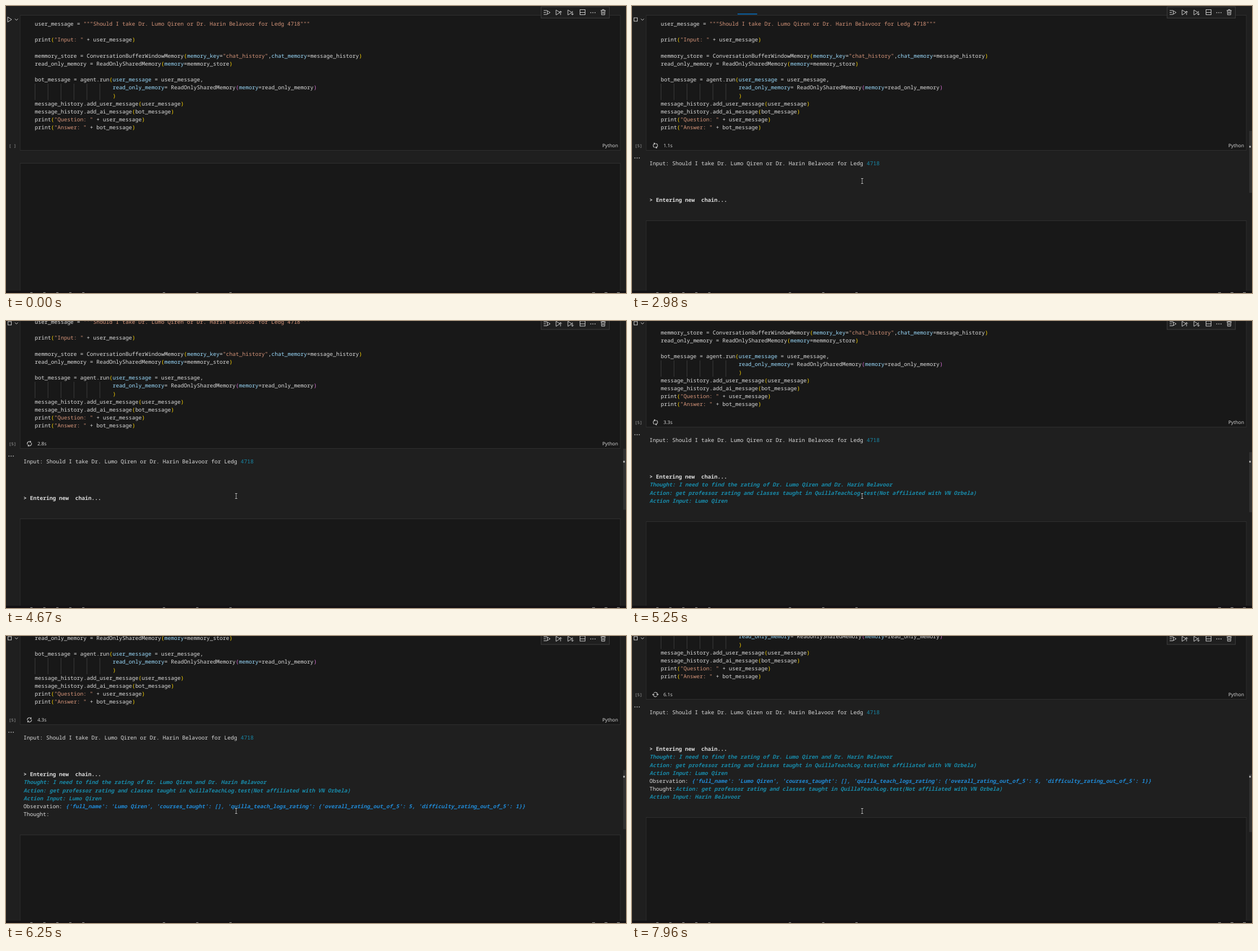
These frames come from a looping animation (1099 by 510 pixels, 8 s). An HTML page with a canvas:

```html
<!DOCTYPE html>
<html lang="en">
<head>
<meta charset="utf-8">
<title>Notebook run</title>
<style>
html, body { margin: 0; width: 100%; height: 100%; overflow: hidden; background: #1f1f1f; }
canvas { display: block; }
</style>
</head>
<body>
<canvas id="stage" width="1099" height="510"></canvas>
<script>
const ctx = document.getElementById('stage').getContext('2d');
const W = 1099, H = 510, LOOP = 8000, TICK = 142;
const PITCH = 5.746, LINE = 14.17, CODE_X = 51, OUT_X = 31;
const MONO = '"Noto Sans Mono", "DejaVu Sans Mono", monospace';
const SANS = '"Open Sans", "Noto Sans", sans-serif';
const C = {
  bg: '#1f1f1f', cell: '#181818', border: '#2f2f2f', text: '#dcdcdc', icon: '#cccccc',
  string: '#d6957a', arg: '#9cdcfe', teal: '#1889a8', blue: '#2089d4', bar: '#0078d4'
};
const BRACKETS = ['#ffd700', '#da70d6'];

const A = 'Lumo Qiren', B = 'Harin Belavoor', COURSE = '4718';
const ASK = `Should I take Dr. ${A} or Dr. ${B} for Ledg `;
const ACTION = 'Action: get professor rating and classes taught in QuillaTeachLog.test(Not affiliated with VN Orbela)';
const INDENT = ' '.repeat(24);
const CODE = `user_message = """${ASK}${COURSE}"""

print("Input: " + user_message)

memmory_store = ConversationBufferWindowMemory(memory_key="chat_history",chat_memory=message_history)
read_only_memory = ReadOnlySharedMemory(memory=memmory_store)

bot_message = agent.run(user_message = user_message,
${INDENT}read_only_memory= ReadOnlySharedMemory(memory=read_only_memory)
${INDENT})
message_history.add_user_message(user_message)
message_history.add_ai_message(bot_message)
print("Question: " + user_message)
print("Answer: " + bot_message)`.split('\n');
const RATING = `{'full_name': '${A}', 'courses_taught': [], 'quilla_teach_logs_rating': ` +
  `{'overall_rating_out_of_5': 5, 'difficulty_rating_out_of_5': 1}}`;

// Ticks at which each part of the output is printed
const AT = { run: 13, input: 15, chain: 17, first: 34, seen: 41, second: 48 };
// Scroll position in wheel steps, reached at these ticks
const SCROLL = [[30, 0], [37, 9], [44, 13], [51, 18], [56, 19]];
const SCROLL_STEP = 7.58;

const clamp = (v, a, b) => Math.min(b, Math.max(a, v));
const ease = p => p * p * (3 - 2 * p);
const mix = (a, b, p) => a + (b - a) * p;
const ramp = (n, a, b) => clamp((n - a) / (b - a), 0, 1);

function scrollAt(n) {
  let steps = 0;
  for (let i = 1; i < SCROLL.length; i++) {
    const [t0, s0] = SCROLL[i - 1], [t1, s1] = SCROLL[i];
    steps += (s1 - s0) * ramp(n, t0, t1);
  }
  return Math.round(SCROLL_STEP * Math.round(steps));
}

function mono(str, x, y, color = C.text, style = '500', size = PITCH / .6) {
  ctx.font = `${style} ${size}px ${MONO}`;
  ctx.fillStyle = color;
  ctx.fillText(str, x, Math.round(y + 3.1));
  return x + str.length * PITCH;
}

function sans(str, x, y) {
  ctx.font = `8.5px ${SANS}`;
  ctx.fillStyle = C.text;
  ctx.fillText(str, x, y + 3);
}

function rect(x, y, w, h, color = C.icon) {
  ctx.fillStyle = color;
  ctx.fillRect(x, y, w, h);
}

function frame(x, y, w, h, color = C.icon) {
  ctx.strokeStyle = color;
  ctx.lineWidth = 1;
  ctx.strokeRect(x + .5, y + .5, w - 1, h - 1);
}

function box(x, y, w, h, fill, border) {
  rect(x, y, w, h, fill);
  frame(x, y, w, h, border);
}

function at(x, y, draw, angle = 0) {
  ctx.save();
  ctx.translate(x, y);
  ctx.rotate(angle);
  draw();
  ctx.restore();
}

function dots(x, y) {
  for (let i = -1; i < 2; i++) rect(x + i * 3.8 - .7, y - .7, 1.5, 1.5);
}

function stroke(path, width = 1) {
  ctx.strokeStyle = C.icon;
  ctx.lineWidth = width;
  ctx.stroke(new Path2D(path));
}

const play = (x, y, w = 7, h = 4.5) => at(x, y, () => stroke(`M0 ${-h}L${w} 0L0 ${h}Z`));
const chevron = (x, y) => at(x, y, () => stroke('M-2.7 -1.3L0 1.4L2.7 -1.3'));

function drawCode() {
  for (let i = 0; i < 6; i++) rect(CODE_X + i * 4 * PITCH, 138, .9, 29, '#404040');
  let depth = 0;
  CODE.forEach((line, row) => {
    for (const m of line.matchAll(/"""[^"]*"""|"[^"]*"|\w+|[()]|[^\w\s()"]+/g)) {
      const s = m[0], rest = line.slice(m.index + s.length);
      let color = C.text;
      if (s[0] === '"') color = C.string;
      else if (s === '(') color = BRACKETS[depth++];
      else if (s === ')') color = BRACKETS[--depth];
      else if (depth && /^\w/.test(s) && /^\s*=/.test(rest)) color = C.arg;
      mono(s, CODE_X + m.index * PITCH, 32 + row * LINE, color);
    }
  });
}

function drawSpinner(n) {
  const angle = (n - AT.run) * TICK / 1500 * Math.PI * 2;
  for (const turn of [0, Math.PI])
    at(41.5, 248, () => stroke('M-3.6 -1A3.7 3.7 0 0 1 3.6 -1M4.6 -3L3.7 -.6L1.5 -1.3'), angle + turn);
}

function drawProgress(n) {
  const p = (n * TICK - 2348) / 4000;
  if (p < 0) return;
  const unit = 21.3, k = p % 1;
  const w = unit * (3 - 4 * Math.abs(k - .5));
  rect(25 + unit * (.5 + k * 50) - w / 2, 13.6, w, 1.4, C.bar);
}

function drawOutput(n) {
  const row = k => 345.2 + k * 14.15, loud = 'italic bold';
  if (n >= AT.input) mono(COURSE, mono('Input: ' + ASK, OUT_X, 280.2), 280.2, C.teal);
  if (n >= AT.chain) mono('> Entering new  chain...', OUT_X, row(0), C.text, 'bold');
  if (n >= AT.first) {
    mono(`Thought: I need to find the rating of Dr. ${A} and Dr. ${B}`, OUT_X, row(1), C.teal, loud);
    mono(ACTION, OUT_X, row(2), C.teal, loud);
    mono('Action Input: ' + A, OUT_X, row(3), C.teal, loud);
  }
  if (n >= AT.seen) {
    mono(RATING, mono('Observation: ', OUT_X, row(4)), row(4), C.blue, loud);
    const end = mono('Thought:', OUT_X, row(5));
    if (n >= AT.second) {
      mono(ACTION, end, row(5), C.teal, loud);
      mono('Action Input: ' + B, OUT_X, row(6), C.teal, loud);
    }
  }
}

function nextCellTop(n) {
  if (n < AT.input) return 279;
  if (n < AT.chain) return 312;
  const rows = 3 * (n >= AT.first) + 2 * (n >= AT.seen) + (n >= AT.second);
  return 381 + rows * LINE;
}

function drawToolbar(y) {
  at(0, y, () => {
    box(948, 1, 122, 21, C.bg, '#3c3c3c');
    for (let i = 0; i < 3; i++) rect(953, 7.5 + i * 3.5, i === 1 ? 4 : 6, 1);
    play(959.5, 11.5, 5, 3.2);
    for (const [x, dir] of [[975, -1], [996, 1]]) {
      play(x, 11.5);
      at(x + 8, 12.5, () => stroke(`M0 ${-3.5 * dir}V${3.5 * dir}M-2.1 ${1.4 * dir}L0 ${3.5 * dir}L2.1 ${1.4 * dir}`));
    }
    frame(1017, 6, 10, 10);
    rect(1017, 11, 10, 1);
    dots(1040.3, 11.7);
    at(1058.5, 8, () => stroke('M-4.5 0H4.5M-1.5 0V-1.7H1.5V0M-3.2 0L-2.8 7.7H2.8L3.2 0M-1 2V6M1 2V6'));
  });
}

function drawRunButton(y, running, hover) {
  if (hover) rect(0, y - 7, 13, 14, '#313233');
  if (running) frame(3, y - 3.5, 7, 7);
  else play(3, y);
  chevron(18.5, y);
}

function drawPointer(x, y, hand) {
  at(x, y, () => {
    let path = 'M0 0V11L3 8.5H8Z';
    if (hand) path = 'M-2 2V-6H-.5L0 -2L4.6 -.5V4L3.5 6.5H-1L-3.8 2Z';
    if (x > 25) path = 'M-2 -4.5H2M0 -4.5V4.5M-2 4.5H2';
    const p = new Path2D(path);
    ctx.lineWidth = 1.8;
    ctx.strokeStyle = '#111';
    ctx.stroke(p);
    if (x > 25) stroke(path, .9);
    else {
      ctx.fillStyle = '#f4f4f4';
      ctx.fill(p);
    }
  });
}

// Walks in from the lower right, goes up to the button, then out over the output
function pointerAt(n) {
  const enter = ease(ramp(n, 1, 4)), rise = ramp(n, 5, 8), leave = ease(ramp(n, 13, 19));
  const x = mix(mix(738, 12, enter), 7, rise);
  const y = mix(mix(498, 66, enter), 35, rise);
  return [mix(x, 408, leave), mix(y, 311, leave)];
}

function drawFooter() {
  rect(0, 506, W, 4, '#131114');
  for (let i = 0; i < 5; i++) {
    rect(43 + i * 23, 508.8, 4, 1.2, '#8b8b8b');
    if (i < 3) rect(278 + i * 59, 508.8, 4, 1.2, '#8b8b8b');
    if (i < 3) rect(1039 + i * 22, 508.8, 5, 1.2, '#8b8b8b');
  }
}

function render(time) {
  const n = Math.floor((time + 25) / TICK);
  const scroll = scrollAt(n), running = n >= AT.run;
  const [px, py] = pointerAt(n);
  const hand = px < 25 && py < 45;

  rect(0, 0, W, H, C.bg);
  at(0, -scroll, () => {
    box(24.5, 16, 1065, 241, C.cell, C.border);
    drawProgress(n);
    drawCode();
    mono(running ? '[5]' : '[ ]', 5, 248, '#a8a8a8', '', 7.2);
    sans('Python', 1057, 248);
    if (running) {
      drawSpinner(n);
      sans(Math.max(0, n * .143 - 1.9425).toFixed(1) + 's', 55.7, 248);
      dots(9, 270);
    }
    drawOutput(n);
  });
  const top = Math.round(nextCellTop(n) - scroll);
  box(24.5, top, 1065, H + 10 - top, C.cell, C.border);
  drawRunButton(Math.max(24 - scroll, 4), n > AT.run, hand);
  drawToolbar(Math.max(-scroll, -6.5));
  if (n >= 8) {
    const y = n < AT.chain ? 235 : 222 + scroll * .163;
    rect(1094, y, 5, 110 - scroll * .05, '#303030');
    rect(1094, 248.5, 3, 3, '#b0b0b0');
  }
  drawFooter();
  if (n > 0) drawPointer(px, py, hand);
}

ctx.textRendering = 'geometricPrecision';
const start = performance.now();
function loop() {
  render((performance.now() - start) % LOOP);
  requestAnimationFrame(loop);
}
loop();
</script>
</body>
</html>
```
